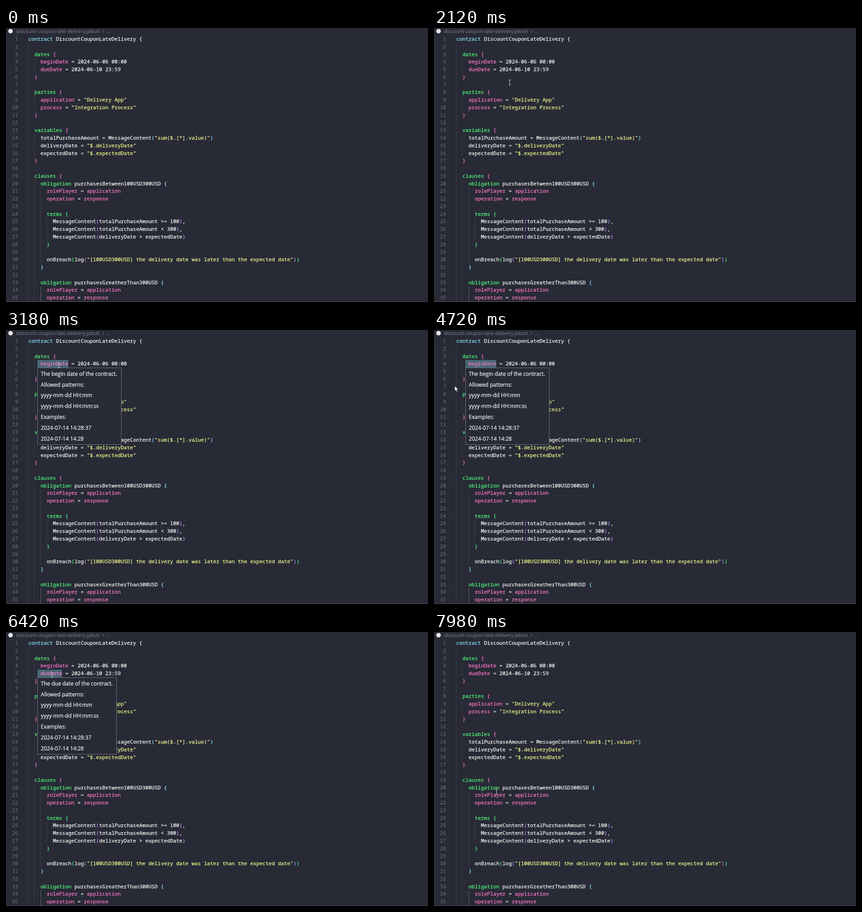
An HTML page that plays this animation: 928x604 px, repeating every 8 s.

```html
<!DOCTYPE html>
<html lang="en">
<head>
<meta charset="utf-8">
<title>Contract editor</title>
<style>
  html, body { margin: 0; width: 100%; height: 100%; overflow: hidden; background: #282a36; }
  svg { display: block; }
  text { white-space: pre; color: #f8f8f2; fill: currentColor; }
  tspan { fill: currentColor; stroke: currentColor; stroke-width: .25px; }
  .code text { font: 11.3px "Noto Sans Mono", monospace; }
  .code .number { color: #70727d; text-anchor: end; }
  .crumb { font: 11.03px "Open Sans", sans-serif; color: #80828d; }
  .tip text { font: 11.77px "Open Sans", sans-serif; color: #fff; stroke: #fff; stroke-width: .2px; }
  .tip rect { fill: #282a36; stroke: #71747f; }
  .chevron { fill: none; stroke: #c5c5c5; }
</style>
</head>
<body>
<svg id="stage" width="928" height="604" viewBox="0 0 928 604"></svg>
<script>
const SOURCE = `contract DiscountCouponLateDelivery {

  dates {
    beginDate = 2024-06-06 00:00
    dueDate = 2024-06-10 23:59
  }

  parties {
    application = "Delivery App"
    process = "Integration Process"
  }

  variables {
    totalPurchaseAmount = MessageContent("sum($.[*].value)")
    deliveryDate = "$.deliveryDate"
    expectedDate = "$.expectedDate"
  }

  clauses {
    obligation purchasesBetween100USD300USD {
      rolePlayer = application
      operation = response

      terms {
        MessageContent(totalPurchaseAmount >= 100),
        MessageContent(totalPurchaseAmount < 300),
        MessageContent(deliveryDate > expectedDate)
      }

      onBreach(log("[100USD300USD] the delivery date was later than the expected date"))
    }

    obligation purchasesGreatherThan300USD {
      rolePlayer = application
      operation = response`.split("\n");

const LOOP = 8000, FRAME = 68, FIRST_MOVE = 820;
const LEFT = 48.9, CHAR = 6.78, ROW = 16.77;
const GREEN = "#50fa7b", PINK = "#ff79c6", CYAN = "#8be9fd", YELLOW = "#f1fa8c", WHITE = "#f8f8f2";
const BRACKETS = [WHITE, PINK, CYAN, GREEN, "#bd93f9"];
const WORDS = {};
const paint = (color, words) => words.split(" ").forEach(word => WORDS[word] = color);
paint(CYAN, "contract");
paint(GREEN, "dates parties variables clauses obligation terms");
paint(PINK, "beginDate dueDate application process rolePlayer operation response");

const escapeText = s => s.replace(/&/g, "&amp;").replace(/</g, "&lt;");
const baseline = row => Math.round(28 + ROW * row);

function drawCode() {
  let depth = 0, guides = "", lines = "", chevrons = "";

  const tokenColor = token => {
    if (token[0] === '"') return YELLOW;
    if (/[({]/.test(token)) return BRACKETS[depth++];
    if (/[)}]/.test(token)) return BRACKETS[--depth];
    return WORDS[token] || WHITE;
  };

  SOURCE.forEach((line, row) => {
    const y = baseline(row);
    const levels = depth - line.trim().startsWith("}");
    for (let level = 0; level < levels; level++) {
      const active = level === 2 && row > 32;
      guides += `<rect x="${Math.floor(LEFT + 2 * CHAR * level)}" y="${y - 12}" width="1" height="${baseline(row + 1) - y}"
        fill="#fff" opacity="${active ? 0.27 : 0.1}"/>`;
    }
    const tokens = line.match(/"[^"]*"|\w+|[(){}]|[^\w"(){}]+/g) || [];
    const spans = tokens.map(token => `<tspan color="${tokenColor(token)}">${escapeText(token)}</tspan>`);
    lines += `<text class="number" x="26.5" y="${y}">${row + 1}</text><text x="${LEFT}" y="${y}">${spans.join("")}</text>`;
    if (line.endsWith("{")) chevrons += `<path d="M36 ${y - 5.5}l3.5 3.5 3.5 -3.5"/>`;
  });
  return { guides, lines, chevrons };
}

function drawTip(name, top, width) {
  const rows = [`The ${name} date of the contract.`, "Allowed patterns:", "yyyy-mm-dd HH:mm", "yyyy-mm-dd HH:mm:ss",
    "Examples:", "2024-07-14 14:28:37", "2024-07-14 14:28"];
  const text = rows.map((row, i) => `<text x="76.6" y="${Math.round(top + 17.8 + 23.8 * i)}">${row}</text>`).join("");
  return `<g class="tip" id="${name}Tip"><rect x="69.5" y="${top + 0.5}" width="${width}" height="169"/>${text}</g>`;
}

const drawMark = (name, top, chars) =>
  `<rect id="${name}Mark" x="69" y="${top}" width="${chars * CHAR}" height="17" fill="#476674"/>`;

const code = drawCode();
const stage = document.getElementById("stage");
stage.innerHTML = `
  <rect width="928" height="604" fill="#282a36"/>
  <circle cx="10" cy="7" r="5" fill="#e6e6ea"/>
  <text class="crumb" x="22" y="11">discount-coupon-late-delivery.jabuti</text>
  <path d="M212.5 3.5l3.5 3.5 -3.5 3.5" fill="none" stroke="#80828d"/>
  <text class="crumb" x="220.5" y="11">...</text>
  ${drawMark("begin", 66, 10)}${drawMark("due", 83, 8)}
  ${code.guides}
  <g class="code">${code.lines}</g>
  <g class="chevron" id="chevrons">${code.chevrons}</g>
  <rect y="603" width="928" height="1" fill="#5a4a5e"/>
  ${drawTip("begin", 83, 184)}${drawTip("due", 100, 173.5)}
  <path id="beam" d="M-2.5 -5.5h2l.5 .5 .5 -.5h2M0 -5v10M-2.5 5.5h2l.5 -.5 .5 .5h2" fill="none" stroke="#d0d0d2"/>
  <path id="arrow" d="M0 0v11.5l2.7 -2.5 1.9 4.2 1.9 -.8 -1.9 -4.1h3.7z" fill="#fff" stroke="#111" stroke-width=".7"/>`;

const part = id => document.getElementById(id);
const beam = part("beam"), arrow = part("arrow"), chevrons = part("chevrons");

// Pointer path: time, x, y
const PATH = [
  [820, 879, 580], [1296, 729.5, 292.5], [1590, 475.5, 174], [1960, 215, 128], [2430, 121, 110],
  [2850, 116, 78], [4110, 116, 78], [4380, 95, 100], [4700, 45, 123.5], [4860, 41, 128], [5100, 44, 126],
  [5580, 101.5, 95], [6420, 101.5, 95], [6940, 477, 270], [7170, 460, 365], [7480, 330, 396],
  [7950, 137.5, 352], [8000, 137.5, 352]
];

// Slope at a path point; zero where the pointer rests.
function slope(i, axis) {
  const before = PATH[i - 1] || PATH[i], here = PATH[i], after = PATH[i + 1] || here;
  const rests = p => p !== here && p[1] === here[1] && p[2] === here[2];
  return rests(before) || rests(after) ? 0 : (after[axis] - before[axis]) / (after[0] - before[0]);
}

function pointerAt(t) {
  const i = Math.max(0, PATH.findIndex(p => p[0] > t) - 1);
  const a = PATH[i], b = PATH[i + 1], span = b[0] - a[0], u = (t - a[0]) / span, v = 1 - u;
  return [1, 2].map(axis =>
    v * v * (1 + 2 * u) * a[axis] + u * u * (3 - 2 * u) * b[axis] +
    span * u * v * (v * slope(i, axis) - u * slope(i + 1, axis)));
}

const clamp = x => Math.min(1, Math.max(0, x));

function showHover(name, t, start, end) {
  const visible = t >= start && t < end;
  part(name + "Tip").setAttribute("opacity", visible ? clamp(0.5 + (t - start) / 140) : 0);
  part(name + "Mark").setAttribute("opacity", visible ? 1 : 0);
}

function render(t) {
  showHover("begin", t, 3110, 4860);
  showHover("due", t, 5810, 6780);
  chevrons.setAttribute("opacity", 0.7 * Math.min(clamp((t - 4590) / 500), clamp((5580 - t) / 450)));

  const moving = t >= FIRST_MOVE;
  const sampled = FIRST_MOVE + Math.floor((t - FIRST_MOVE) / FRAME) * FRAME;
  const [x, y] = moving ? pointerAt(sampled) : [0, 0];
  const inGutter = x < LEFT;
  beam.setAttribute("transform", `translate(${Math.floor(x) + 0.5} ${Math.floor(y)})`);
  arrow.setAttribute("transform", `translate(${x} ${y})`);
  beam.setAttribute("opacity", moving && !inGutter ? 1 : 0);
  arrow.setAttribute("opacity", moving && inGutter ? 1 : 0);
}

const started = performance.now();
function tick() {
  render((performance.now() - started) % LOOP);
  requestAnimationFrame(tick);
}
tick();
</script>
</body>
</html>
```
